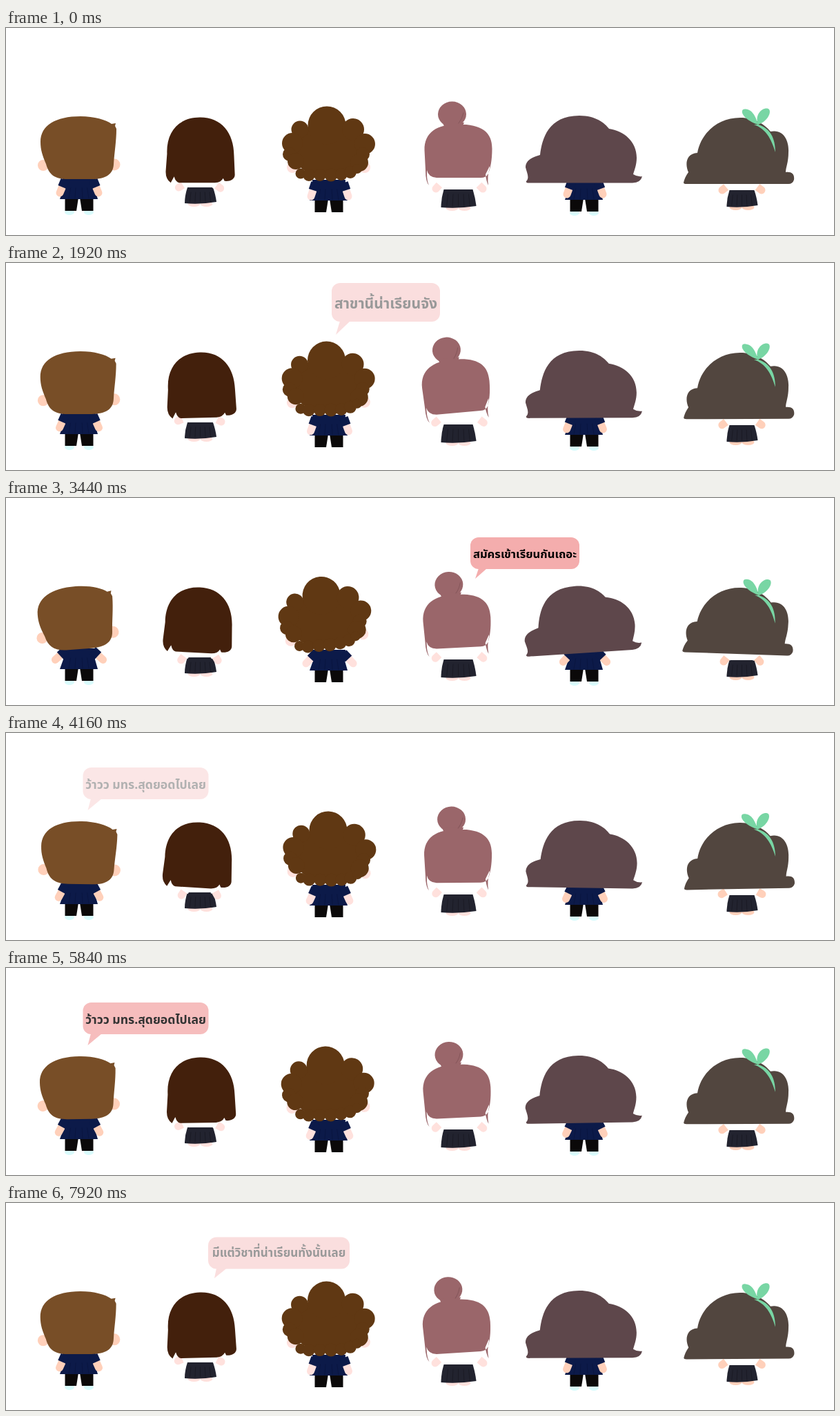
Recreate the animation shown at these times as an HTML page. Size 1200 px wide and 300 px high, loop 8000 ms.

```html
<!DOCTYPE html>
<html lang="th">
<head>
<meta charset="utf-8">
<style>
  html, body { margin: 0; width: 100%; height: 100%; overflow: hidden; background: #fff; }
  svg { display: block; width: 100%; height: 100%; }
  text { font-family: "Noto Sans Thai Looped", "Noto Sans Thai", "Noto Sans", sans-serif; font-weight: 700; text-anchor: middle; }
</style>
</head>
<body>
<svg id="stage" viewBox="0 0 1200 300"></svg>
<script>
const PEACH = '#ffd0ba', PINK = '#ffe1dd', NAVY = '#0c1a49', BLACK = '#0b0909', SKIRT = '#22232f';
const LOOP = 8000, SCENE = 2000;
const wave = (t, period, phase = 0) => Math.sin(2 * Math.PI * (t / period + phase));

// Swings to both sides and lingers upright in between.
function sway(t) {
  const s = wave(t, SCENE);
  return s * Math.abs(s);
}

const path = (d, fill) => `<path d="${d}" fill="${fill}"/>`;
const line = (d, color, width, cap = 'round') =>
  `<path d="${d}" fill="none" stroke="${color}" stroke-width="${width}" stroke-linecap="${cap}"/>`;
const oval = (x, y, rx, ry, fill) => `<ellipse cx="${x}" cy="${y}" rx="${rx}" ry="${ry}" fill="${fill}"/>`;
const ball = (x, y, r, fill) => oval(x, y, r, r, fill);

// Navy shirt and trousers, centred on x; y is the hem of the shirt.
function suit(x, y, shoes) {
  const pleats = [-15, -6, 5, 14].map(p => `M${x + p} ${y - 1}l${-p / 6} -15`).join('');
  const leg = side => path(
    `M${x + side * 20.5} ${y - 2}H${x + side}L${x + side * 4} ${y + 17}H${x + side * 20.5}Z`, BLACK);
  const shoe = side => shoes ? oval(x + side * 14, y + 19, 7, 4, '#d9fbfc') : '';
  return shoe(-1) + shoe(1) + leg(-1) + leg(1) +
    path(`M${x - 24} ${y - 30}H${x + 24}L${x + 23} ${y - 14}L${x + 27} ${y}H${x - 28}L${x - 23} ${y - 14}Z`, NAVY) +
    line(pleats, '#091540', 1);
}

// Pleated skirt with the feet below it.
function skirt(x, y, w, h, skin) {
  const pleats = [-.6, -.3, 0, .3, .6].map(p => `M${x + p * w / 2} ${y + 7}L${x + p * w * .56} ${y + h - 3}`).join('');
  return oval(x - 9, y + h, 9, 4, skin) + oval(x + 9, y + h, 9, 4, skin) +
    path(`M${x - w / 2 + 4} ${y}H${x + w / 2 - 4}Q${x + w / 2} ${y + h / 2} ${x + w / 2 + 1} ${y + h - 3}Q${x} ${y + h + 1} ${x - w / 2} ${y + h - 1}Q${x - w / 2} ${y + h / 2} ${x - w / 2 + 4} ${y}Z`, SKIRT) +
    line(pleats, '#1a1a24', 1);
}

// Each arm hangs from a shoulder; dx, dy lead to the hand.
function arm(x, y, dx, dy, skin, sleeve) {
  const at = k => `${x + dx * k} ${y + dy * k}`;
  return line(`M${at(.55)}L${at(1)}`, skin, 11) +
    line(`M${at(-.1)}L${at(.5)}`, sleeve || '#fff', 13, 'butt');
}

const curls = [[465, 141, 27.5], [426, 147, 12.5], [503, 147, 16], [415, 167, 15], [520, 168, 15],
  [411, 183, 10], [517, 183, 10], [420, 193, 12], [512, 195, 13], [427, 211, 7.5], [439, 213, 9],
  [455, 213, 9], [471, 213, 9.5], [486, 212, 9], [499, 209, 9], [509, 204, 7]];

const people = [
  {
    skin: PEACH, sleeve: NAVY, pivot: [106, 222], body: suit(106, 248, true),
    arms: [[85, 222, -7, 17], [127, 222, 7, 17]],
    tilt: t => 4.5 * sway(t), lift: t => 26 * Math.abs(sway(t)),
    head: ball(54, 199, 8, PEACH) + ball(157, 198, 8.5, PEACH) +
      path('M50 165C50 141 72 128 108 128C128 128 145 133 153 139L159 138L158 142L160 146C160 165 157 180 156 198C155 212 145 219 124 219H90C70 219 62 212 58 197C53 185 50 177 50 165Z', '#784e27')
  },
  {
    skin: PINK, pivot: [281, 130], body: skirt(281.5, 231, 45, 24, PINK),
    arms: [[262, 224, -11, 8], [300, 224, 10, 9]],
    tilt: t => .2 + 3.5 * wave(t, 3000, -.03), lift: t => -7 * 3.5 * wave(t, 3000, -.03),
    head: path('M233 182C232 150 250 129.500 281 129.500C312 129.500 330 152 330 185L331 213C331 220 323 223 316 222L314 218Q311 224 302 224.500L250 224Q245 223 243 215L238 224Q230 218 231 206Z', '#43200c')
  },
  {
    skin: PINK, sleeve: NAVY, pivot: [466, 230], body: suit(468, 250, false),
    arms: [[448, 226, -6, 18], [490, 226, 6, 18]],
    tilt: t => 5.3 * sway(t), lift: t => 26 * Math.abs(sway(t)),
    head: ball(415, 202, 8, PINK) + ball(520, 202, 8, PINK) +
      oval(466, 177, 50, 40, '#603813') + curls.map(c => ball(...c, '#603813')).join('')
  },
  {
    skin: PINK, pivot: [655, 218], body: skirt(655.5, 234, 50, 27, PINK),
    arms: [[633, 222, -10, 11], [680, 222, 11, 11]],
    tilt: t => -2.7 * (1 - wave(t, 4650, .25)), lift: t => 4 * (1 - wave(t, 4650, .25)),
    head: oval(646.5, 125, 20.5, 18.5, '#9a666a') +
      path('M633 137H664L660 146H636ZM606.500 177C606 151 625 139.500 655 139.500C690 139.500 704.500 151 704.500 175C704.500 192 702 203 699 211Q696 217 688 217H624Q612 216 610 206L610 212Q610 222 613 228Q608 223 608 206ZM701 200L695 212Q696 222 699 228Q697 215 701 203Z', '#9a666a') +
      line('M663 123Q661 132 656 138', '#85565a', 1)
  },
  {
    skin: PEACH, sleeve: NAVY, pivot: [838, 224], body: suit(838, 249, true),
    arms: [[819, 225, -6, 16], [859, 225, 6, 16]],
    tilt: t => 3.9 * sway(t), lift: t => 23 * Math.abs(sway(t)),
    head: path('M754 222C759 217 755 210 753 202C753 191 764 187 774 184C777 160 786 127 831 127C855 127 868 138 874 146C895 149 914 164 914 188C914 198 911 205 909 212Q915 216 922 215Q920 224 908 224.500H760Q753 225 754 222Z', '#5e474b')
  },
  {
    skin: PEACH, pivot: [1062, 172], body: skirt(1066.5, 235, 44, 25, PEACH),
    arms: [[1049, 226, -11, 9], [1083, 226, 12, 9]],
    tilt: t => -2.8 * wave(t, 3920), lift: t => 17 * wave(t, 3920),
    head: path('M982 224C984 216 987 212 989 209C984 198 985 182 1002 181C1007 152 1032 130 1064 130C1085 130 1100 140 1108 150C1128 146 1135 165 1134 180C1134 195 1130 202 1130 209C1139 208 1143 212 1142 220Q1140 226 1134 226H986Q982 226 982 224Z', '#52463f') +
      path('M1090 140C1064 131 1063 116 1072 117.500C1082 118 1087 130 1089 137C1086 122 1100 113 1106 118C1110 124 1101 137 1090 140C1107 145 1115 159 1115 180C1109 160 1101 146 1084 140Z', '#78d6a4')
  }
];

const bubbles = [
  { x: 472, y: 29, w: 157, h: 56, tail: [484, 499, 478, 104], size: 21.2, base: 66, words: 'สาขานี้น่าเรียนจัง' },
  { x: 673, y: 57, w: 158, h: 46, tail: [685, 697, 680, 117], size: 16.6, base: 87, words: 'สมัครเข้าเรียนกันเถอะ' },
  { x: 111.5, y: 50, w: 182, h: 46, tail: [123, 139, 118.5, 112], size: 17.6, base: 80.5, words: 'ว้าวว มทร.สุดยอดไปเลย' },
  { x: 293, y: 49.5, w: 205, h: 46, tail: [305, 320, 302, 109], size: 17, base: 77.5, words: 'มีแต่วิชาที่น่าเรียนทั้งนั้นเลย' }
];

function bubbleMarkup({ x, y, w, h, tail: [left, right, tipX, tipY], size, base, words }) {
  return `<g class="bubble"><rect x="${x}" y="${y}" width="${w}" height="${h}" rx="12" fill="#f4adad"/>` +
    path(`M${left} ${y + h - 1}H${right}L${tipX} ${tipY}Z`, '#f4adad') +
    `<text x="${x + w / 2}" y="${base}" font-size="${size}">${words}</text></g>`;
}

const stage = document.getElementById('stage');
stage.innerHTML = people.map(p =>
  `<g>${p.body}${p.arms.map(a => `<g class="arm">${arm(...a, p.skin, p.sleeve)}</g>`).join('')}` +
  `<g class="head">${p.head}</g></g>`).join('') + bubbles.map(bubbleMarkup).join('');

const heads = stage.querySelectorAll('.head');
const arms = stage.querySelectorAll('.arm');
const balloons = stage.querySelectorAll('.bubble');
const turn = (node, angle, [x, y]) => node.setAttribute('transform', `rotate(${angle} ${x} ${y})`);

function draw(now) {
  const t = now % LOOP;
  people.forEach((p, i) => {
    turn(heads[i], p.tilt(t), p.pivot);
    turn(arms[2 * i], p.lift(t), p.arms[0]);
    turn(arms[2 * i + 1], -p.lift(t), p.arms[1]);
  });
  balloons.forEach((node, i) => {
    const local = t - i * SCENE;
    const opacity = Math.min((local - 40) / 400, (SCENE - local) / 200, 1);
    node.setAttribute('opacity', Math.max(0, opacity));
  });
}

const start = performance.now();
function tick() {
  draw(performance.now() - start);
  requestAnimationFrame(tick);
}
tick();
</script>
</body>
</html>
```
